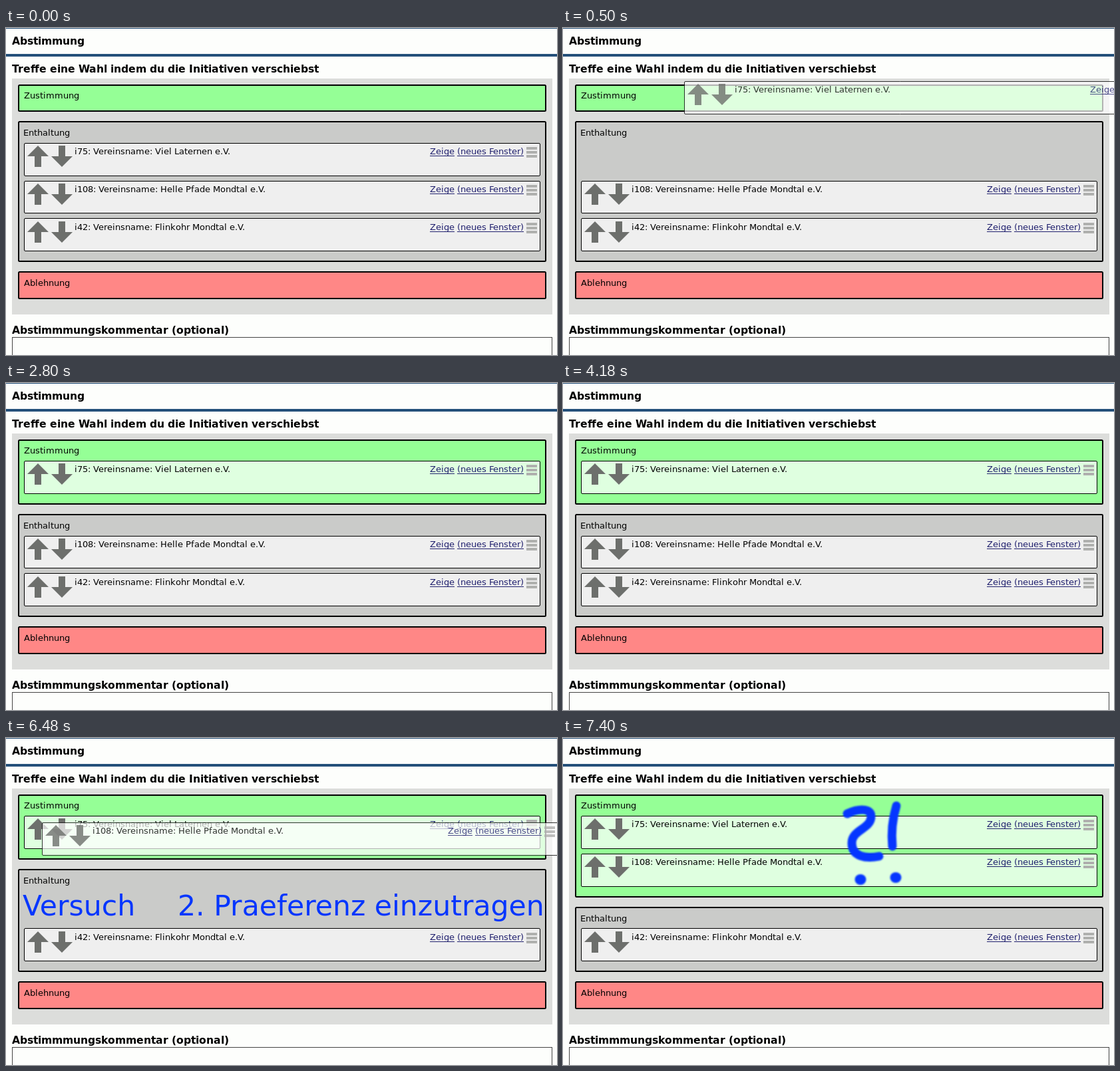
An HTML page with a canvas that plays this animation: 828 px wide and 492 px high, repeating every 8 s.

```html
<!DOCTYPE html>
<html lang="de">
<head>
<meta charset="utf-8">
<title>Abstimmung</title>
<style>
  html, body { margin: 0; width: 100%; height: 100%; overflow: hidden; background: #fdfefc; }
  canvas { display: block; }
</style>
</head>
<body>
<canvas id="stage" width="828" height="492"></canvas>
<script>
const ctx = document.getElementById('stage').getContext('2d');
const LOOP = 8000;
const FAMILY = '"DejaVu Sans", sans-serif';
const BODY = '13px ' + FAMILY;
const HEADING = 'bold 15.6px ' + FAMILY;
const BLUE = '#0536ff';
const NAMES = {
  i75: 'Viel Laternen e.V.',
  i108: 'Helle Pfade Mondtal e.V.',
  i42: 'Flinkohr Mondtal e.V.'
};

// Row heights are fractional, so boxes and contents snap separately.
const ROW_HEIGHT = 49.6;
const SCENES = [
  { start: 0, approve: 41, neutral: 140,
    rows: [['i75', 173.45], ['i108', 230], ['i42', 286.5]] },
  { start: 500, approve: 41, neutral: 140,
    rows: [['i108', 230], ['i42', 286.5]], drag: ['i75', 80.45, 182] },
  { start: 2800, approve: 98, neutral: 197,
    rows: [['i75', 117.45], ['i108', 230], ['i42', 286.5]] },
  { start: 5100, approve: 98, neutral: 197, caption: true,
    rows: [['i75', 117.45], ['i42', 286.5]], drag: ['i108', 127.45, 54] },
  { start: 7400, approve: 155, neutral: 254, scribble: true,
    rows: [['i75', 117.45], ['i108', 174.45], ['i42', 286.5]] }
];

function rect(x, y, w, h, color) {
  ctx.fillStyle = color;
  ctx.fillRect(x, y, w, h);
}

function box(x, y, w, h, line, fill) {
  ctx.beginPath();
  ctx.roundRect(x + line / 2, y + line / 2, w - line, h - line, 1.5);
  ctx.fillStyle = fill;
  ctx.fill();
  ctx.lineWidth = line;
  ctx.strokeStyle = '#000';
  ctx.stroke();
}

// Whole-pixel advances and kerning, like hinted desktop text. Returns the end.
function text(string, x, y, font = BODY, color = '#000') {
  ctx.font = font;
  ctx.fillStyle = color;
  const width = s => ctx.measureText(s).width;
  [...string].forEach((char, i) => {
    const next = string[i + 1] || '';
    const kern = width(char + next) - width(char) - width(next);
    ctx.fillText(char, x, y);
    x += Math.round(width(char)) + Math.round(kern);
  });
  return x;
}

function link(string, x, y) {
  const end = text(string, x, y, BODY, '#20206e');
  rect(x, y + 2, end - x, 1, '#20206e');
}

function arrow(x, y, up) {
  ctx.save();
  ctx.translate(x + 16, y + 16);
  if (!up) ctx.scale(1, -1);
  ctx.beginPath();
  ctx.moveTo(0, -16);
  ctx.lineTo(16, 0);
  ctx.lineTo(5, 0);
  ctx.lineTo(5, 16);
  ctx.lineTo(-5, 16);
  ctx.lineTo(-5, 0);
  ctx.lineTo(-16, 0);
  ctx.fillStyle = '#6d6f6c';
  ctx.fill();
  ctx.restore();
}

function row([id, y, x = 27], fillAlpha = 0.7) {
  const top = Math.floor(y);
  box(x, top, 776, Math.floor(y + ROW_HEIGHT) - top, 1, `rgba(255,255,255,${fillAlpha})`);
  const inner = Math.round(y);
  arrow(x + 5, inner + 4, true);
  arrow(x + 41, inner + 4, false);
  text(`${id}: Vereinsname: ${NAMES[id]}`, x + 76, inner + 17);
  link('Zeige', x + 610, inner + 17);
  link('(neues Fenster)', x + 651, inner + 17);
  for (let i = 0; i < 3; i++) rect(x + 755, inner + 6 + i * 6, 16, 4, '#afb0ae');
}

function caption() {
  ctx.font = '42.6px ' + FAMILY;
  ctx.fillStyle = BLUE;
  ctx.fillText('Versuch', 25, 267);
  ctx.fillText('2. Praeferenz einzutragen', 258, 267);
}

function scribble() {
  ctx.save();
  ctx.filter = 'blur(1px)';
  ctx.strokeStyle = ctx.fillStyle = BLUE;
  ctx.lineWidth = 13;
  ctx.lineCap = ctx.lineJoin = 'round';
  ctx.beginPath();
  ctx.moveTo(427, 114);
  ctx.bezierCurveTo(442, 107, 463, 104, 463, 118);
  ctx.bezierCurveTo(463, 137, 434, 138, 434, 158);
  ctx.bezierCurveTo(434, 179, 456, 182, 475, 178);
  ctx.moveTo(501, 102);
  ctx.quadraticCurveTo(492, 132, 495, 163);
  ctx.stroke();
  for (const [x, y] of [[447, 213], [500, 210]]) {
    ctx.beginPath();
    ctx.ellipse(x, y, 8.5, 8, 0, 0, Math.PI * 2);
    ctx.fill();
  }
  ctx.restore();
}

function draw(scene) {
  rect(0, 0, 828, 492, '#fdfefc');
  rect(0, 0, 828, 1, '#24507a');
  rect(0, 39, 828, 4, '#24507a');
  text('Abstimmung', 9, 25, HEADING);
  text('Treffe eine Wahl indem du die Initiativen verschiebst', 9, 67, HEADING);

  rect(9, 76, 812, 355, '#dcdddb');
  box(18, 85, 794, scene.approve, 2, '#95ff96');
  text('Zustimmung', 27, 106);
  box(18, scene.neutral, 794, 352 - scene.neutral, 2, '#cacbc9');
  text('Enthaltung', 26, scene.neutral + 22);
  box(18, 366, 794, 42, 2, '#ff8786');
  text('Ablehnung', 27, 388);

  text('Abstimmmungskommentar (optional)', 9, 460, HEADING);
  rect(9, 465, 812, 27, '#444');
  rect(10, 466, 810, 26, '#fdfefc');

  scene.rows.forEach(item => row(item));
  if (scene.caption) caption();
  if (scene.scribble) scribble();
  if (scene.drag) {
    ctx.globalAlpha = 0.8;
    row(scene.drag, 0.875);
    ctx.globalAlpha = 1;
  }
}

function tick() {
  const time = performance.now() % LOOP;
  draw(SCENES.findLast(scene => scene.start <= time));
  requestAnimationFrame(tick);
}
tick();
</script>
</body>
</html>
```
